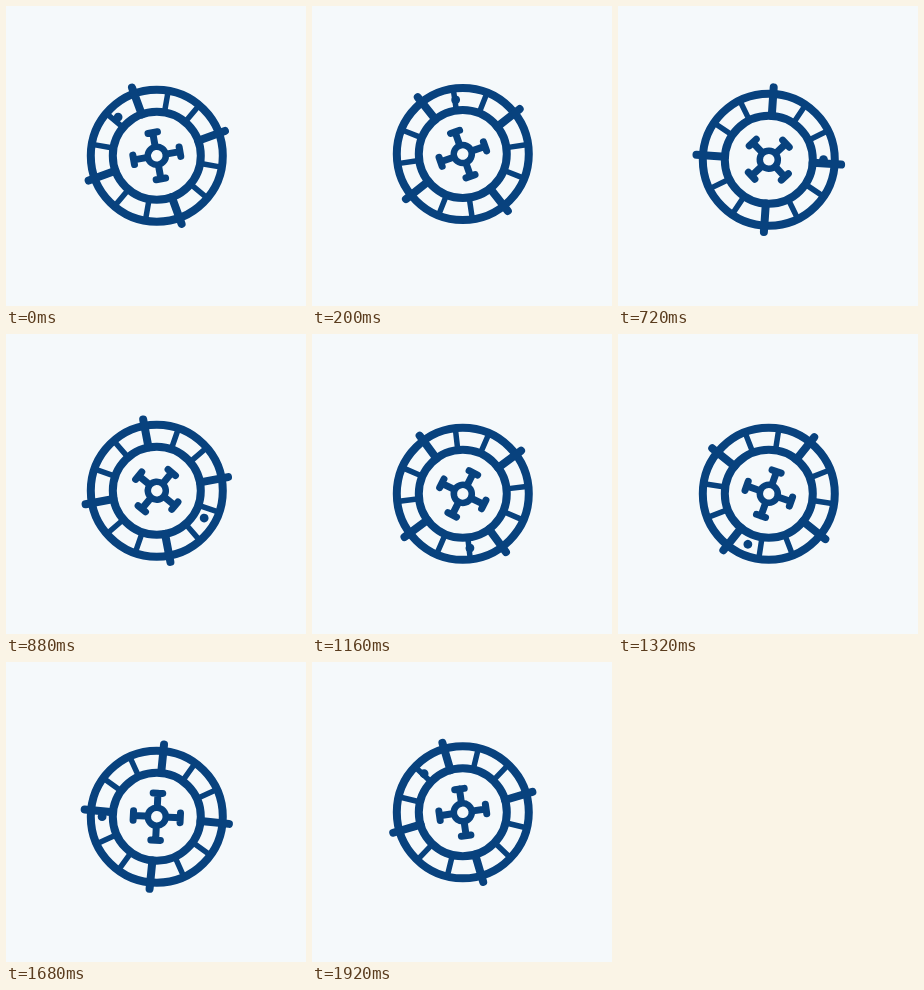
Write an HTML page that moves like this. It is 300 by 300 pixels and loops after 1960 ms.

```html
<!DOCTYPE html>
<html lang="en">
<head>
<meta charset="utf-8">
<title>Roulette wheel</title>
<style>
  @property --step {
    syntax: "<number>";
    inherits: true;
    initial-value: 0;
  }
  html, body {
    margin: 0;
    width: 100%;
    height: 100%;
    overflow: hidden;
    background: #f5f9fb;
  }
  svg {
    display: block;
    width: 100vw;
    height: 100vh;
    fill: none;
    stroke: #08427e;
    stroke-linecap: round;
    animation: run 1960ms steps(49) infinite;
  }
  /* One cycle is 49 poses of 40 ms each */
  @keyframes run {
    from { --step: 0; }
    to { --step: 49; }
  }
  .bob {
    transform: translate(150.8px, calc(154px - 6px * cos(var(--step) * 360deg / 49 - 45deg)));
  }
  .wheel { transform: rotate(calc(-20deg - var(--step) * 180deg / 49)); }
  .hub { transform: rotate(calc(-10deg - var(--step) * 90deg / 49)); }
  .ball { transform: rotate(calc(-135deg + var(--step) * 7.5deg)); }
  .ball circle { fill: #08427e; stroke: none; }
</style>
</head>
<body>
<svg viewBox="0 0 300 300">
  <defs>
    <g id="sector">
      <path d="M44 0H72.5" stroke-width="8"/>
      <path id="rib" d="M46 0H64" stroke-width="5.5" transform="rotate(30)"/>
      <use href="#rib" transform="rotate(30)"/>
    </g>
    <path id="arm" d="M12 0H23.5M23.5 -4.8V4.8" stroke-width="7"/>
  </defs>
  <g class="bob">
    <circle r="66" stroke-width="8"/>
    <circle r="44" stroke-width="8"/>
    <g class="wheel">
      <use href="#sector"/>
      <use href="#sector" transform="rotate(90)"/>
      <use href="#sector" transform="rotate(180)"/>
      <use href="#sector" transform="rotate(270)"/>
    </g>
    <g class="ball"><circle cx="54.7" r="4.4"/></g>
    <g class="hub">
      <circle r="9" stroke-width="6.5"/>
      <use href="#arm"/>
      <use href="#arm" transform="rotate(90)"/>
      <use href="#arm" transform="rotate(180)"/>
      <use href="#arm" transform="rotate(270)"/>
    </g>
  </g>
</svg>
</body>
</html>
```
